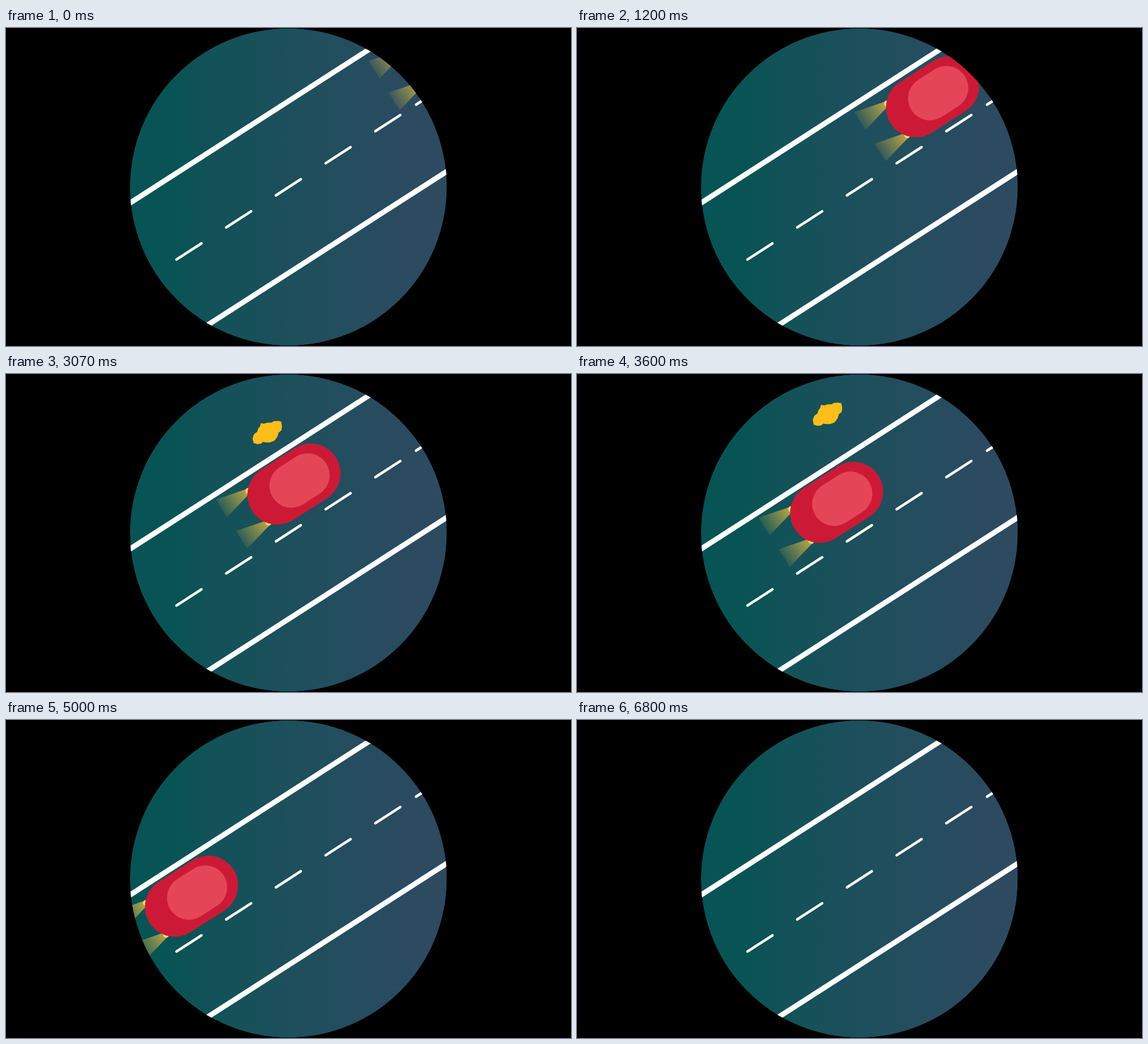
An HTML page with a canvas for the animation above (6.94 s loop, 998 px wide and 561 px high).

```html
<!DOCTYPE html>
<html lang="en">
<head>
<meta charset="utf-8">
<title>Night road</title>
<style>
  html, body { margin: 0; width: 100%; height: 100%; overflow: hidden; background: #000; }
  canvas { display: block; }
</style>
</head>
<body>
<canvas id="stage" width="998" height="561"></canvas>
<script>
const ctx = document.getElementById('stage').getContext('2d');
const LOOP = 6940, STEP = 200 / 3, LAST = 102;
const MID = { x: 498.8, y: 280.5, r: 279.8 };
const STOP = { x: 539.25, y: 174.5, arrive: 1909, leave: 2739 };
const TILT = -32.55 * Math.PI / 180;

// Outline of the thrown wrapper, relative to its centre
const WRAPPER = [
  [-11.5, -16], [-6, -15], [0.5, -17], [7, -17], [11.5, -19.5], [18, -20],
  [24, -19], [25.5, -11], [24.5, -4], [19.5, 0], [17.5, 7], [12.5, 14],
  [4.5, 17], [-2.5, 17], [-7.5, 16], [-11.5, 19.5], [-18, 20], [-24, 18],
  [-25.5, 10], [-23, 3], [-17.5, -1], [-15.5, -7], [-12.5, -11]
];

const ground = ctx.createLinearGradient(219, 0, 779, 0);
[[0, '#085355'], [0.13, '#085353'], [0.26, '#125258'], [0.5, '#1d4f5c'],
 [0.72, '#254d5f'], [0.9, '#2c4a60'], [1, '#2d4a61']]
  .forEach(([at, color]) => ground.addColorStop(at, color));

const beam = ctx.createLinearGradient(-131, 0, -72, 0);
beam.addColorStop(0, 'rgba(214,182,66,0.12)');
beam.addColorStop(1, 'rgba(214,182,66,0.88)');

function line(x1, y1, x2, y2, width, cap) {
  ctx.lineWidth = width;
  ctx.lineCap = cap;
  ctx.beginPath();
  ctx.moveTo(x1, y1);
  ctx.lineTo(x2, y2);
  ctx.stroke();
}

function disc(x, y, r, color) {
  ctx.fillStyle = color;
  ctx.beginPath();
  ctx.arc(x, y, r, 0, Math.PI * 2);
  ctx.fill();
}

function capsule(x, half, r, color) {
  ctx.strokeStyle = color;
  line(x - half, 0, x + half, 0, r * 2, 'round');
}

function road() {
  disc(MID.x, MID.y, MID.r, ground);
  ctx.strokeStyle = '#fff';
  line(201, 320.3, 661, 25.2, 9.2, 'butt');
  line(338, 535.6, 798, 240.5, 9.2, 'butt');
  ctx.strokeStyle = '#fcfefb';
  for (let i = -2; i <= 2; i++) {
    const x = 498.8 + i * 87.8, y = 281 - i * 56.6;
    line(x - 22, y + 14.2, x + 22, y - 14.2, 4.6, 'round');
  }
  line(724.3, 135.2, 768, 107, 4.6, 'round');
}

function wrapper(t) {
  if (t < STOP.arrive) return;
  const dt = t - 3070;
  ctx.save();
  ctx.translate(461.5 - 0.0358 * dt, 103 - 0.0606 * dt);
  ctx.fillStyle = ctx.strokeStyle = '#fdbe1a';
  ctx.lineWidth = 1;
  ctx.lineJoin = 'round';
  ctx.beginPath();
  WRAPPER.forEach(([x, y]) => ctx.lineTo(x, y));
  ctx.closePath();
  ctx.fill();
  ctx.stroke();
  ctx.restore();
}

function carOffset(t) {
  if (t < STOP.arrive) {
    const d = 0.1252 * (STOP.arrive - t);
    return [d, -0.6 * d];
  }
  const d = 0.0936 * Math.max(0, t - STOP.leave);
  return [-d, 0.644 * d];
}

function car(t) {
  const [dx, dy] = carOffset(t);
  ctx.save();
  ctx.translate(STOP.x + dx, STOP.y + dy);
  ctx.rotate(TILT);
  for (const side of [-1, 1]) {
    const y = side * 33;
    ctx.fillStyle = beam;
    ctx.beginPath();
    ctx.moveTo(-55, y);
    ctx.lineTo(-131, y - 18.4);
    ctx.lineTo(-131, y + 18.4);
    ctx.fill();
    disc(-74, y, 5.5, '#ffd76c');
  }
  capsule(0, 35.1, 52.6, '#cc1a36');
  capsule(11.8, 17.2, 38.7, '#e54657');
  ctx.restore();
}

function draw(t) {
  ctx.clearRect(0, 0, 998, 561);
  ctx.save();
  ctx.beginPath();
  ctx.arc(MID.x, MID.y, MID.r, 0, Math.PI * 2);
  ctx.clip();
  road();
  wrapper(t);
  car(t);
  ctx.restore();
}

const start = performance.now();
function tick() {
  const t = (performance.now() - start) % LOOP;
  draw(Math.min(LAST, Math.floor(t / STEP)) * STEP);
  requestAnimationFrame(tick);
}
tick();
</script>
</body>
</html>
```
